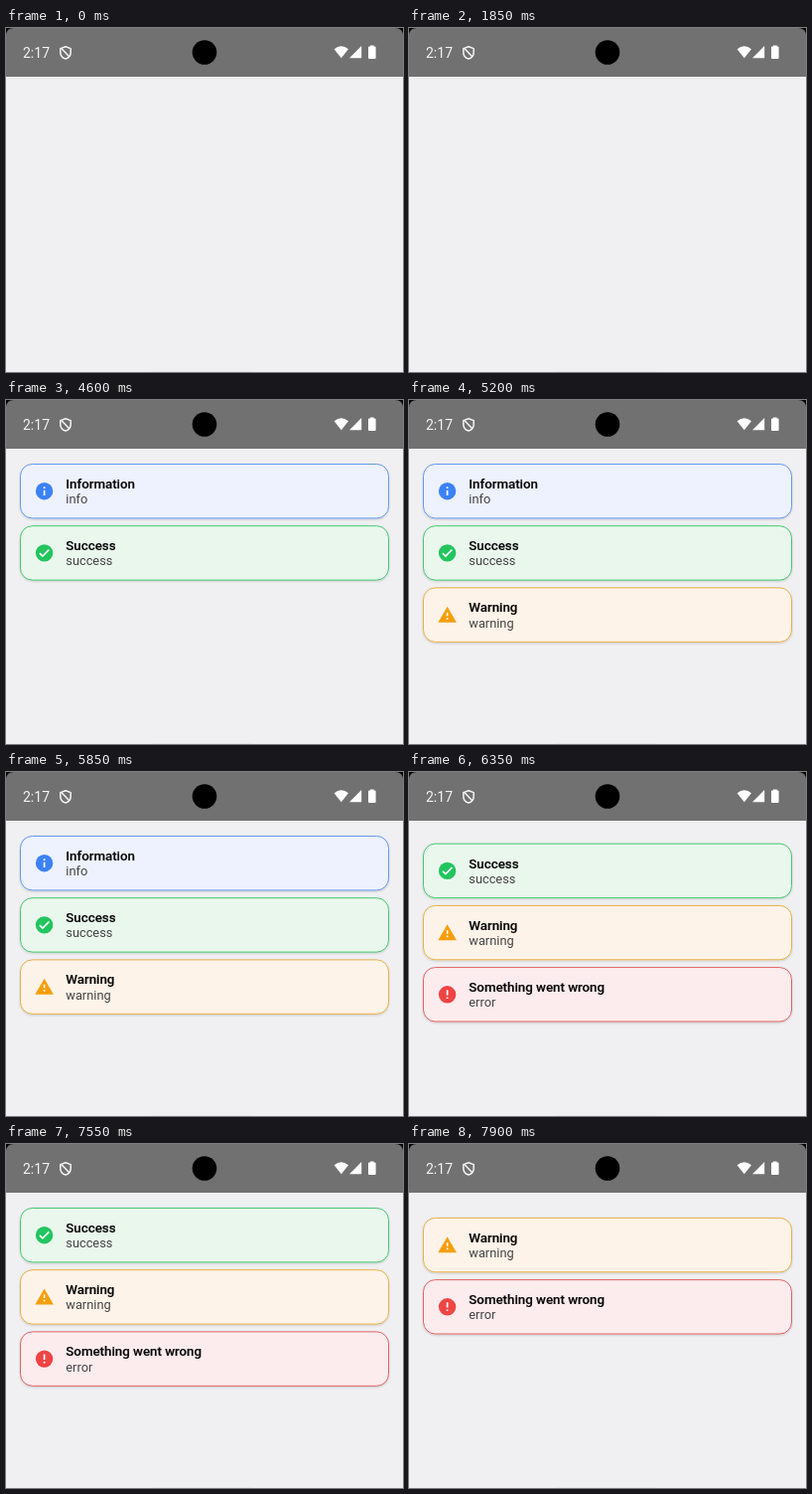
Write an HTML page that moves like this. It is 400 by 346 pixels and loops after 8000 ms.

```html
<!DOCTYPE html>
<html lang="en">
<head>
<meta charset="utf-8">
<title>Toast stack</title>
<style>
  html, body { margin: 0; width: 100%; height: 100%; overflow: hidden; background: #f0f0f2; }
  svg { display: block; width: 100vw; height: 100vh; }
  text { font-family: Roboto, sans-serif; }
  .clock { font-size: 14px; fill: #f4f4f4; }
  .title { font-size: 13.3px; font-weight: 500; fill: #050505; stroke: #050505; stroke-width: .15px; }
  .body { font-size: 12.8px; fill: #444; }
</style>
</head>
<body>
<svg viewBox="0 0 400 346" preserveAspectRatio="none">
  <defs>
    <filter id="shadow" x="-5%" y="-15%" width="110%" height="140%">
      <feDropShadow dx="0" dy="1" stdDeviation="0.9" flood-color="#000" flood-opacity=".17"/>
    </filter>
  </defs>
  <rect width="400" height="346" fill="#f0f0f2"/>
  <rect x="146" y="345" width="104" height="1" fill="#e9e9eb"/>

  <g id="bar">
    <rect width="400" height="49" fill="#717171"/>
    <path d="M0 0H8Q0 0 0 8ZM400 0H392Q400 0 400 8Z" fill="#000"/>
    <text class="clock" x="17" y="30">2:17</text>
    <g fill="none" stroke="#f4f4f4" stroke-width="1.5" stroke-linejoin="round">
      <path d="M60 18.7L65.2 20.6V24.4C65.2 27.6 63 30 60 31C57 30 54.8 27.6 54.8 24.4V20.6Z"/>
      <path d="M56 20.8L64 29"/>
    </g>
    <circle cx="200" cy="24.5" r="12.3" fill="#000"/>
    <g fill="#fff">
      <path d="M330.6 21.2Q337.8 15.2 345 21.2L337.8 30.2Z"/>
      <path d="M358.2 18V30.2H346Z"/>
      <path d="M367 18.4V17.4H370.6V18.4H371.6Q372.6 18.4 372.6 19.4V30Q372.6 31 371.6 31H366Q365 31 365 30V19.4Q365 18.4 366 18.4Z"/>
    </g>
  </g>
  <g id="stack"></g>
</svg>
<script>
  const LOOP = 8000, TOP = 64.5, STEP = 62.2;

  const disc = (color, mark) => `<circle r="8.7" fill="${color}"/>${mark}`;
  const icons = {
    info: disc('#3b82f6', '<path d="M-.85 -4.4h1.7v1.7h-1.7zM-.85 -.9h1.7v5.3h-1.7z" fill="#fff"/>'),
    success: disc('#22c55e', '<path d="M-4.7 .2L-1.7 3.2L4.8 -3.4" fill="none" stroke="#fff" stroke-width="1.7"/>'),
    warning: '<path d="M0 -8.3L9.3 7.6H-9.3Z" fill="#f59e0b"/><path d="M-.8 -2.3h1.6v3.5h-1.6zM-.8 2.9h1.6v1.7h-1.6z" fill="#fff"/>',
    error: disc('#ef4444', '<path d="M-.85 -4.5h1.7v5.3h-1.7zM-.85 2.6h1.7v1.7h-1.7z" fill="#fff"/>')
  };

  const toasts = [
    { kind: 'info', title: 'Information', fill: '#eef2fe', edge: '#6598ec', enter: 2750, exit: 6050 },
    { kind: 'success', title: 'Success', fill: '#eaf7ed', edge: '#47c872', enter: 3850, exit: 7580 },
    { kind: 'warning', title: 'Warning', fill: '#fdf3e8', edge: '#e8b04a', enter: 4930, exit: Infinity },
    { kind: 'error', title: 'Something went wrong', fill: '#fdecee', edge: '#e06464', enter: 6000, exit: Infinity }
  ];
  const shifts = [6100, 7672];

  const stack = document.getElementById('stack');
  stack.innerHTML = toasts.map(t => `<g>
    <rect x="14.5" y="0" width="371" height="54.4" rx="12" fill="${t.fill}" stroke="${t.edge}" filter="url(#shadow)"/>
    <g transform="translate(38.6 27.2)">${icons[t.kind]}</g>
    <text class="title" x="60.3" y="24.6">${t.title}</text>
    <text class="body" x="60.3" y="39.8">${t.kind}</text>
  </g>`).join('');
  const cards = [...stack.children];

  const ramp = (t, start, span) => Math.min(1, Math.max(0, (t - start) / span));
  const easeOut = p => 1 - (1 - p) ** 3;

  function draw(t) {
    toasts.forEach((toast, i) => {
      // Each removal above a card lifts it by one slot.
      const lift = shifts.slice(0, i).reduce((sum, s) => sum + easeOut(ramp(t, s, 500)), 0);
      const shown = easeOut(ramp(t, toast.enter, 300));
      const alpha = shown * (1 - ramp(t, toast.exit, 200));
      const scale = .96 + .04 * shown;
      const y = TOP + STEP * (i - lift);
      cards[i].setAttribute('opacity', alpha);
      cards[i].setAttribute('transform',
        `translate(200 ${y + 27.2}) scale(${scale}) translate(-200 -27.2)`);
      cards[i].setAttribute('visibility', alpha > 0 ? 'visible' : 'hidden');
    });
  }

  const start = performance.now();
  function tick() {
    draw((performance.now() - start) % LOOP);
    requestAnimationFrame(tick);
  }
  tick();
</script>
</body>
</html>
```
